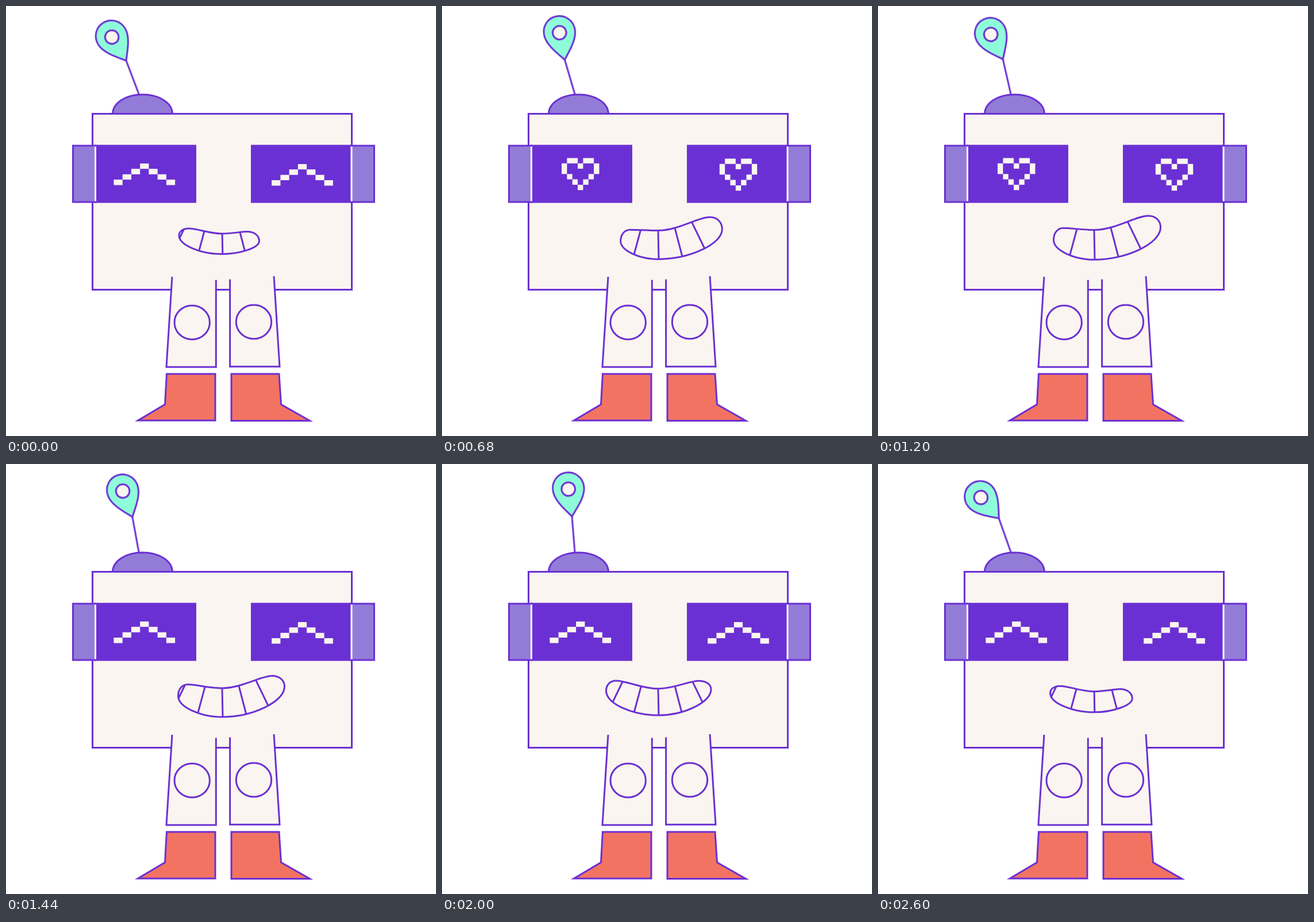
An HTML page that plays this animation: 748x748 px, repeating every 2640 ms.

```html
<!DOCTYPE html>
<html lang="en">
<head>
<meta charset="utf-8">
<title>Robot</title>
<style>
  html, body { margin: 0; height: 100%; overflow: hidden; background: #fff; }
  svg { display: block; width: 100vw; height: 100vh; }
  .line { stroke: #6b30d3; stroke-width: 3; }
  .cream { fill: #faf5f0; }
  .lilac { fill: #937cd8; }
  .violet { fill: #6b30d3; }
  .coral { fill: #f37363; }
  .mint { fill: #8ffcd9; }
  .none { fill: none; }
  .stalk { transform-origin: 231px 153px; animation: sway 2640ms linear infinite; }
  .pin { transform-origin: 231px 91px; animation: flick 2640ms linear infinite; }
  #heart { animation: love 2640ms step-end infinite; }
  #caret { animation: smile 2640ms step-end infinite; }

  @keyframes sway {
    0%, 100% { transform: rotate(-20.8deg); }
    11.4% { transform: rotate(-2.7deg); }
    27.3% { transform: rotate(-17.8deg); }
    80.3% { transform: rotate(-3.3deg); }
  }
  @keyframes flick {
    0% { transform: rotate(-10.6deg); animation-timing-function: ease-out; }
    14% { transform: rotate(7deg); animation-timing-function: cubic-bezier(.5, 0, .75, 0); }
    37% { transform: rotate(-16deg); }
    84.8% { transform: rotate(0deg); }
    98.5% { transform: rotate(-21.5deg); }
    100% { transform: rotate(-10.6deg); }
  }
  @keyframes love {
    0% { opacity: 0; }
    4.5% { opacity: 1; }
    54.5%, 100% { opacity: 0; }
  }
  @keyframes smile {
    0% { opacity: 1; }
    4.5% { opacity: 0; }
    54.5%, 100% { opacity: 1; }
  }
</style>
</head>
<body>
<svg viewBox="0 0 748 748">
  <defs>
    <clipPath id="lips"><path class="mouth"/></clipPath>
  </defs>

  <g class="stalk">
    <path class="line none" d="M231 154V91"/>
    <g class="pin line">
      <path class="mint" stroke-linejoin="round" d="M231 91C222 79 204 60 204 42C204 26 216 14 231 14S258.500 26 258.500 42C258.500 60 241 78 231 91Z"/>
      <circle class="cream" cx="231" cy="43" r="11.800"/>
    </g>
  </g>

  <g class="line">
    <path class="lilac" d="M185.500 187.500C186 168 209 154 237.500 154S289 168 289.500 187.500"/>
    <path class="cream" d="M150.500 187.500H601.500V493.500H150.500Z"/>
    <path class="lilac" d="M116.500 243H156V341H116.500ZM600 243H640.500V341H600Z"/>
  </g>
  <path class="violet" d="M154 241.500H331V342.500H154ZM426 241.500H602V342.500H426Z"/>
  <path stroke="#fff" stroke-width="3" d="M155.500 244.500V339.500M601 244.500V339.500"/>
  <path class="cream" id="heart"/>
  <path class="cream" id="caret"/>

  <path class="mouth line cream"/>
  <path class="line none" clip-path="url(#lips)" d="M324 358.400L285 438.700M354 358.400L331 443.500M375.300 358L377.200 450M397.700 358L420 443.500M425.800 358L465 438.700"/>

  <g class="line">
    <path class="cream" d="M289 471L279 628H365.300V476.500M466 470L476 627.300H389.600V475.500"/>
    <ellipse class="cream" cx="323.700" cy="550.500" rx="30.700" ry="29.500"/>
    <ellipse class="cream" cx="431" cy="549.500" rx="30.700" ry="29.500"/>
    <path class="coral" d="M279.500 640H364V721H229.500L276.500 693ZM392 640H475L478.500 693L528.500 721.500H392Z"/>
  </g>
</svg>
<script>
  // Pixel eyes, one centred on each screen
  function drawEyes(id, rows, w, h, top) {
    let d = '';
    for (const [cx, y] of [[240.8, top], [515.5, top + 1]])
      rows.forEach((row, r) => [...row].forEach((c, i) => {
        if (c === '#') d += `M${cx + (i - 3.5) * w} ${y + r * h}h${w}v${h}h${-w}z`;
      }));
    document.getElementById(id).setAttribute('d', d);
  }
  drawEyes('heart', [' ## ## ', '#  #  #', '#     #', ' #   # ', '  # #  ', '   #   '], 9.34, 9.3, 264.4);
  drawEyes('caret', ['   #   ', '  # #  ', ' #   # ', '#     #'], 15.24, 9.35, 274);

  // Smooth mouth through its ends, two upper bumps, dip and bottom
  const mix = (a, b, k) => a + (b - a) * k;
  function outline({ left: [lx, ly, ay], right: [rx, ry, by], dip, low }) {
    const mid = 376, ax = lx + 17, bx = rx - 21.5;
    return `path("M${lx} ${ly}` +
      `C${lx} ${mix(ly, ay, .58)} ${mix(ax, lx, .6)} ${ay} ${ax} ${ay}` +
      `C${mix(ax, mid, .26)} ${ay} ${mix(mid, ax, .4)} ${dip} ${mid} ${dip}` +
      `C${mix(mid, bx, .39)} ${dip} ${mix(bx, mid, .23)} ${by} ${bx} ${by}` +
      `C${mix(bx, rx, .6)} ${by} ${rx} ${mix(ry, by, .58)} ${rx} ${ry}` +
      `C${rx} ${mix(ry, low, .52)} ${mix(mid, rx, .47)} ${low} ${mid} ${low}` +
      `C${mix(mid, lx, .5)} ${low} ${lx} ${mix(ly, low, .52)} ${lx} ${ly}Z")`;
  }

  // each end: x, y, height of its bump
  const small = outline({ left: [301, 399, 387], right: [440.5, 409, 392.5], dip: 396, low: 431.5 });
  const lean = outline({ left: [313.5, 412, 390], right: [501, 382, 360], dip: 389, low: 443 });
  const wide = outline({ left: [282.5, 393, 375.5], right: [464.5, 393, 379], dip: 391, low: 436.5 });
  for (const el of document.querySelectorAll('.mouth'))
    el.animate([{ d: small }, { d: lean, offset: 1 / 3 }, { d: wide, offset: .803 }, { d: small }],
      { duration: 2640, iterations: Infinity });
</script>
</body>
</html>
```
